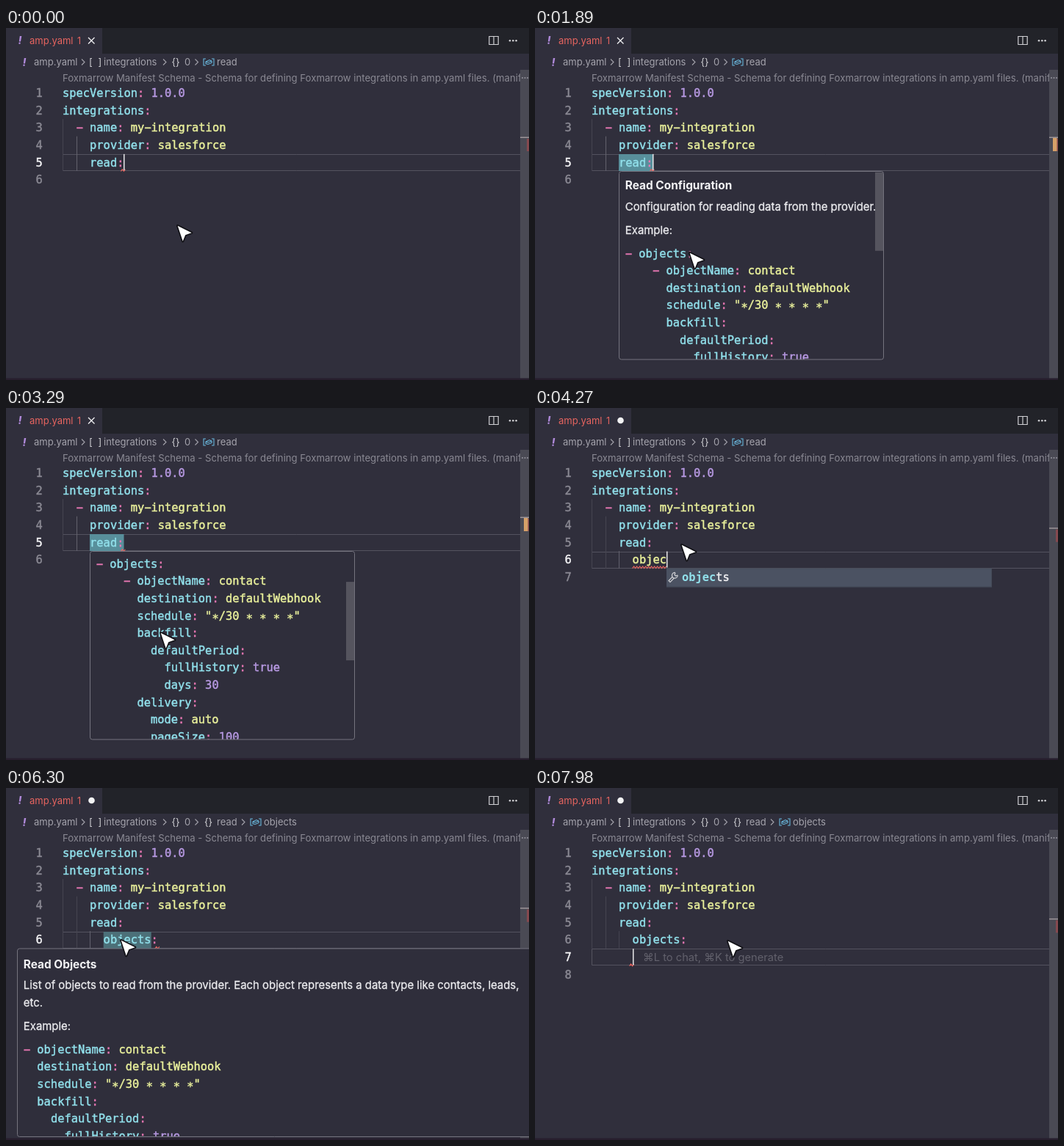
Animation of 712 by 480 pixels, one loop 8000 ms. Source, as an HTML page with a canvas:

```html
<!DOCTYPE html>
<html lang="en">
<head>
<meta charset="utf-8">
<title>YAML schema hints</title>
<style>
html, body { margin: 0; width: 100%; height: 100%; overflow: hidden; background: #302f3c; }
canvas { display: block; }
</style>
</head>
<body>
<canvas id="stage" width="712" height="480"></canvas>
<script>
const ctx = document.getElementById('stage').getContext('2d');
const LOOP = 8000, CHAR = 9.27, LINE = 23.67, LEFT = 77;
const MONO = '15.4px "DejaVu Sans Mono", monospace';
const ui = (size, weight = 400) => `${weight} ${size}px Inter, sans-serif`;
const C = {
  bg: '#302f3c', bar: '#222329', border: '#54535f', key: '#91e0eb', punct: '#ea78b5',
  text: '#e9f09b', num: '#b799e2', dim: '#8a8993', crumb: '#a4a3ac', white: '#f3f3f5',
  icon: '#d0d0d4', red: '#e6645f', purple: '#b18bdc', blue: '#69b7dc'
};

const POINTER = [[0, 233, 269], [100, 233, 269], [700, 145, 186], [1300, 145, 186],
  [1850, 210, 306], [3450, 210, 306], [3800, 199, 186], [5740, 199, 186],
  [6000, 156, 207], [6950, 156, 207], [7300, 262, 208], [LOOP, 262, 208]];
const SCROLL = [[0, 0], [1880, 0], [2150, 47], [2500, 47], [3000, 96.7], [LOOP, 96.7]];
const KEYS = [[3850, 'o'], [3940, 'ob'], [4030, 'obj'], [4120, 'obje'], [4220, 'objec'],
  [4350, 'object'], [4450, 'objects'], [4700, 'objects:']];
const ENTER_1 = 3720, ACCEPT = 4700, CRUMB = 5150, ENTER_2 = 7910;

const BASE = ['specVersion: 1.0.0', 'integrations:', '  - name: my-integration',
  '    provider: salesforce', '    read:'];
const OBJECT = ['- objectName: contact', '  destination: defaultWebhook',
  '  schedule: "*/30 * * * *"', '  backfill:', '    defaultPeriod:',
  '      fullHistory: true', '      days: 30', '  delivery:', '    mode: auto', '    pageSize: 100'];
const READ_HOVER = {
  x: 114, y: 195, w: 361, title: 'Read Configuration',
  body: ['Configuration for reading data from the provider.'],
  code: ['- objects:', ...OBJECT.map(s => '    ' + s)], bar: true
};
const OBJECTS_HOVER = {
  x: 15, y: 218.5, w: 720, title: 'Read Objects',
  body: ['List of objects to read from the provider. Each object represents a data type like contacts, leads,', 'etc.'],
  code: OBJECT
};

const between = (t, a, b) => t >= a && t < b;
const readHovered = t => between(t, 880, 3650);
const objectsHovered = t => between(t, 6080, 7150);
const lineTop = n => 76.7 + LINE * (n - 1);
const baseline = n => lineTop(n) + 17.3;

function keyframes(keys, t, ease = u => u) {
  const i = Math.max(1, keys.findIndex(k => k[0] > t));
  const [a, b] = [keys[i - 1], keys[i]];
  const u = ease((t - a[0]) / (b[0] - a[0]));
  return a.slice(1).map((v, j) => v + (b[j + 1] - v) * u);
}

function fill(x, y, w, h, color) {
  ctx.fillStyle = color;
  ctx.fillRect(x, y, w, h);
}

// heft thickens the glyphs slightly without changing their widths
function label(s, x, y, color, font, heft = 0) {
  ctx.font = font;
  ctx.fillStyle = ctx.strokeStyle = color;
  ctx.fillText(s, x, y);
  if (!heft) return;
  ctx.lineWidth = heft;
  ctx.strokeText(s, x, y);
}

// wide hyphens and centred asterisks, as in the editor's typeface
function mono(s, x, y, color, weight = '') {
  const glyphs = s.replace(/-/g, '\u2212').replace(/\*/g, '\u2217');
  label(glyphs, x, y, color, weight + MONO, weight ? 0 : 0.45);
}

function path(points, color, width = 1, closed = false) {
  ctx.beginPath();
  points.forEach(p => ctx.lineTo(...p));
  if (closed) ctx.closePath();
  ctx.strokeStyle = color;
  ctx.lineWidth = width;
  ctx.stroke();
}

function disc(x, y, r, color) {
  ctx.beginPath();
  ctx.arc(x, y, r, 0, 7);
  ctx.fillStyle = color;
  ctx.fill();
}

function codeLine(s, x, y) {
  const [, indent, dash, key, colon, value] = s.match(/^( *)(- )?([^:]*)(:?)(.*)$/);
  const valueColor = /^ (true|[\d.]+)$/.test(value) ? C.num : C.text;
  let col = indent.length;
  for (const [part, color] of [[dash || '', C.punct], [key, colon ? C.key : C.text],
    [colon, C.punct], [value, valueColor]]) {
    mono(part, x + col * CHAR, y, color);
    col += part.length;
  }
}

function squiggle(x1, x2, y) {
  const points = [];
  for (let x = x1, i = 0; x <= x2; x += 2, i++) points.push([x, y + (i % 2 ? -1.3 : 1.3)]);
  path(points, C.red, 1.2);
}

function tabBar(dirty) {
  fill(0, 0, 712, 35, C.bar);
  fill(0, 0, 131, 35, C.bg);
  label('!', 16.5, 22, C.purple, 'italic ' + ui(14, 800));
  label('amp.yaml', 32, 21.5, C.red, ui(13));
  label('1', 97, 21.5, C.red, ui(12.5));
  if (dirty) disc(116.5, 17, 4.3, C.white);
  else {
    path([[112, 13], [120.5, 21.5]], C.white, 1.3);
    path([[120.5, 13], [112, 21.5]], C.white, 1.3);
  }
  path([[657.8, 11.5], [670.2, 11.5], [670.2, 22.5], [657.8, 22.5]], C.icon, 1.2, true);
  path([[664, 11.5], [664, 22.5]], C.icon, 1.2);
  for (const x of [686, 690.3, 694.6]) disc(x, 17.3, 1.3, C.icon);
}

function chevron(x) {
  path([[x - 2, 42.5], [x + 2, 46.5], [x - 2, 50.5]], C.crumb, 1.1);
}

function fieldIcon(x) {
  path([[x - 4, 42], [x - 7, 42], [x - 7, 51], [x - 4, 51]], C.blue, 1.1);
  path([[x + 4, 42], [x + 7, 42], [x + 7, 51], [x + 4, 51]], C.blue, 1.1);
  path([[x - 4, 46], [x + 1, 43.5], [x + 4, 45], [x + 4, 47.5], [x - 1, 49.5], [x - 4, 48.5]], C.blue, 1.1, true);
  path([[x - 4, 46], [x - 1, 47], [x + 4, 45]], C.blue, 1);
}

function breadcrumbs(deep) {
  const crumb = (s, x, color = C.crumb) => label(s, x, 51, color, ui(13));
  label('!', 22.5, 51.5, C.purple, 'italic ' + ui(14, 800));
  crumb('amp.yaml', 38);
  crumb('[', 113, C.icon);
  crumb(']', 125.5, C.icon);
  crumb('integrations', 133);
  crumb('{}', 225.5, C.icon);
  crumb('0', 243);
  crumb('read', 287);
  [105, 216, 259.5].forEach(chevron);
  if (deep) {
    crumb('{}', 270, C.icon);
    chevron(323);
    fieldIcon(340);
    crumb('objects', 351);
  } else fieldIcon(276);
}

function rulerStrip(row, marked) {
  fill(700, 57, 12, 421, '#4a4a54');
  const y = 149 + (row - 5) * 14.7;
  fill(709, y + 2, 3, 17, '#85494f');
  if (marked) fill(705, y, 5.5, 19, '#d6a168');
  fill(700, y - 0.5, 12, 1.5, '#9d9599');
  for (const x of [703, 706.5, 710]) disc(x, 68, 1, '#96959e');
}

function editor(t, typed) {
  const row = t >= ENTER_2 ? 7 : t >= ENTER_1 ? 6 : 5;
  const lines = [...BASE];
  if (row > 5) lines.push('      ' + typed);
  label('Foxmarrow Manifest Schema - Schema for defining Foxmarrow integrations in amp.yaml files. (manif',
    LEFT, 72.5, C.dim, ui(13.17));

  const top = Math.ceil(lineTop(row)) + 0.5;
  path([[LEFT + 0.5, top], [720, top], [720, top + 22], [LEFT + 0.5, top + 22]], C.border, 1, true);

  const bottom = lineTop(Math.min(row, 6) + 1);
  for (let level = 0; level < Math.min(row - 3, 3); level++) {
    const x = Math.round(LEFT + level * 2 * CHAR) + 0.5;
    const start = level < 2 ? level + 3 : 6;
    path([[x, lineTop(start)], [x, bottom]], level === row - 4 ? '#62616d' : '#454450');
  }

  if (readHovered(t)) fill(114, 172, 46.5, 23, '#588f9b');
  if (objectsHovered(t)) fill(132.7, 196, 65, 23, '#4c7079');

  for (let n = 1; n <= row + 1; n++) {
    mono(String(n), 40.5, baseline(n), n === row ? C.white : C.dim);
  }
  lines.forEach((s, i) => codeLine(s, LEFT, baseline(i + 1)));

  const indent = LEFT + 6 * CHAR;
  let caretX = LEFT + 9 * CHAR;
  if (row === 6) caretX = indent + typed.length * CHAR;
  if (row === 7) caretX = indent;
  const under = lineTop(row + 1) - 1;
  if (row === 6 && typed && t < ACCEPT) squiggle(indent, caretX, under - 0.5);
  else squiggle(caretX - 4, caretX + 3, under);

  if ((row === 6 && !typed) || row === 7) {
    label('⌘L to chat, ⌘K to generate', 147, baseline(row) - 0.3, '#62616c', ui(14.7));
  }

  const typing = between(t, ENTER_1, 5200) || t >= ENTER_2;
  const phase = t % 1000;
  const blinkOn = t < ENTER_1 ? !between(phase, 50, 550) : !between(phase, 200, 700);
  if (typing || blinkOn) fill(Math.round(caretX), lineTop(row) + 0.5, 1.5, 22, '#e6e6e8');
  rulerStrip(row, readHovered(t));
}

function suggestion(typed) {
  const x = LEFT + 11 * CHAR;
  fill(x, 218.5, 443, 26, '#454c5a');
  fill(x, 219.5, 442, 23.5, '#4b5262');
  ctx.beginPath();
  ctx.arc(190.3, 228.3, 3.8, -0.1, 4.9);
  ctx.strokeStyle = C.icon;
  ctx.lineWidth = 1.3;
  ctx.stroke();
  path([[194, 228], [191.5, 229], [190, 227.5], [191, 224.7]], C.icon, 1.2);
  path([[187.3, 230], [182, 235.5], [184, 237.5], [189.3, 232]], C.icon, 1.2);
  mono(typed, 200, baseline(7), C.key, 'bold ');
  mono('objects'.slice(typed.length), 200 + typed.length * CHAR, baseline(7), C.white);
}

function hover({ x, y, w, title, body, code, bar }, scroll) {
  const textX = x + 8.8;
  const prose = s => label(s, textX, line, '#ececef', ui(14.9), 0.3);
  let line = y + 27.4 - scroll;
  ctx.beginPath();
  ctx.roundRect(x + 0.5, y + 0.5, w - 1, 256.5, 3);
  ctx.fillStyle = '#2f2e3b';
  ctx.fill();
  ctx.save();
  ctx.clip();
  label(title, textX, line, C.white, ui(15.4, 700));
  line += 28.5;
  for (const s of body) {
    prose(s);
    line += LINE;
  }
  line += 8;
  prose('Example:');
  line += 32;
  code.forEach((s, i) => codeLine(s, textX, line + i * 23.6));
  if (bar) fill(x + 349, y + 1 + scroll * 0.425, 11, 107, '#55545e');
  ctx.restore();
  ctx.strokeStyle = '#74737e';
  ctx.lineWidth = 1;
  ctx.stroke();
}

function pointer(x, y) {
  ctx.save();
  ctx.translate(x + 0.7, y + 0.7);
  ctx.lineJoin = 'round';
  path([[0, 0], [19, 9.5], [10.5, 12.5], [7, 21]], '#111116', 3.4, true);
  ctx.fillStyle = '#fff';
  ctx.fill();
  ctx.restore();
}

function draw(t) {
  const typed = KEYS.reduce((s, [at, text]) => t >= at ? text : s, '');
  fill(0, 0, 712, 480, C.bg);
  tabBar(t >= ENTER_1);
  breadcrumbs(t >= CRUMB);
  editor(t, typed);
  fill(0, 477.5, 712, 2.5, '#271f2e');
  if (typed && t < ACCEPT) suggestion(typed);
  if (readHovered(t)) hover(READ_HOVER, keyframes(SCROLL, t)[0]);
  if (objectsHovered(t)) hover(OBJECTS_HOVER, 0);
  pointer(...keyframes(POINTER, t, u => u * u * (3 - 2 * u)));
}

function tick() {
  draw(performance.now() % LOOP);
  requestAnimationFrame(tick);
}
tick();
</script>
</body>
</html>
```
